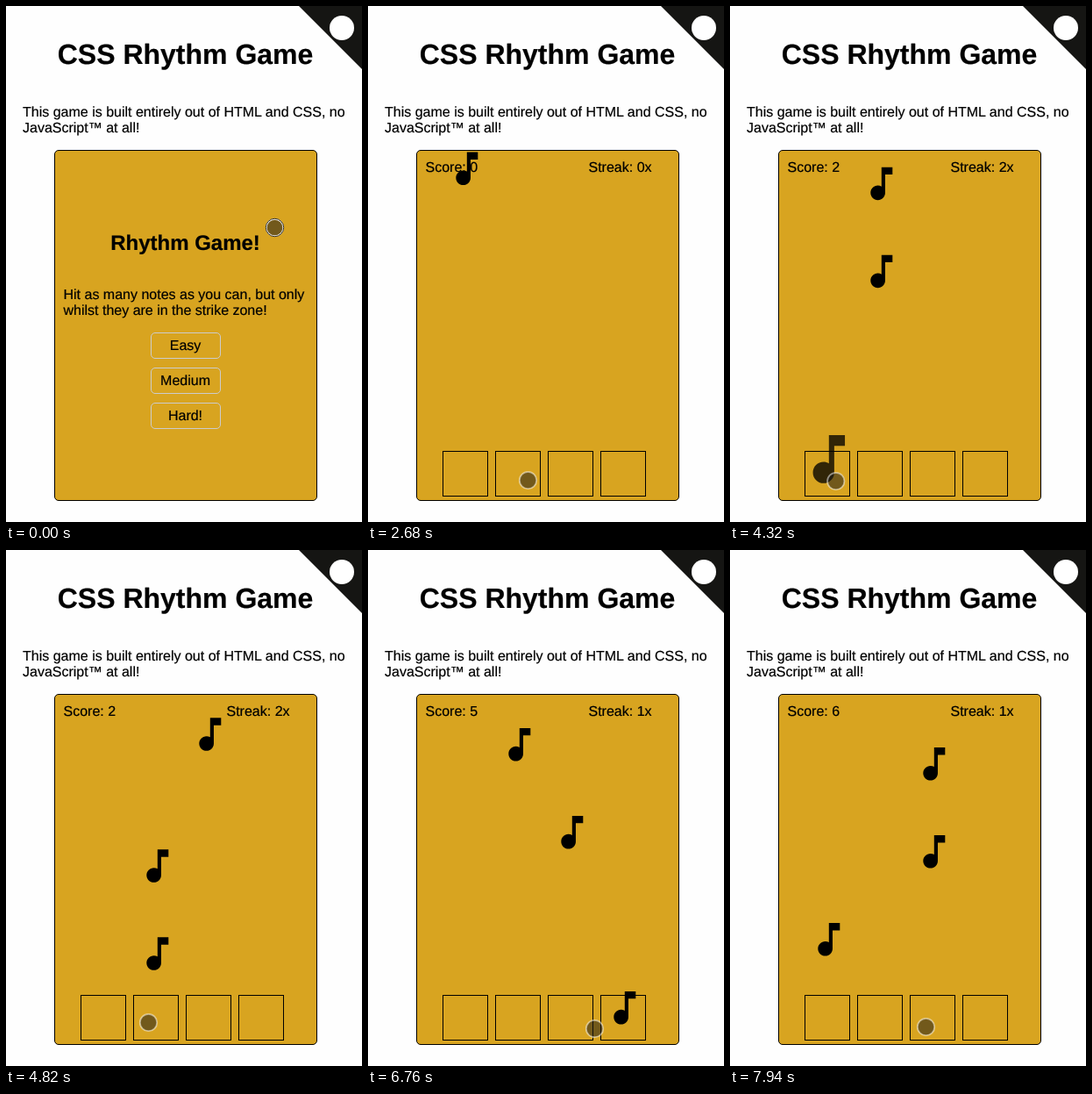
Recreate the animation shown at these times as an HTML page. Size 406 by 588 pixels, loop 8000 ms.

```html
<!DOCTYPE html>
<html lang="en">
<head>
<meta charset="utf-8">
<title>CSS Rhythm Game</title>
<style>
  html, body { margin: 0; width: 100%; height: 100%; overflow: hidden; background: #fefefe; }
  svg { display: block; width: 406px; height: 588px; font: 16px "Liberation Sans", Arial, sans-serif; }
  text { text-rendering: geometricPrecision; stroke: #000; stroke-width: .2px; }
  .title { font-size: 32px; font-weight: bold; }
  .heading { font-size: 24px; font-weight: bold; }
  .middle { text-anchor: middle; }
  .line { fill: none; stroke: #000; }
  .button { fill: none; stroke: #ccc; }
</style>
</head>
<body>
<svg viewBox="0 0 406 588">
  <defs>
    <path id="note" transform="scale(2.0833) translate(-12 -12)"
      d="M12 3v10.55c-.59-.34-1.27-.55-2-.55-2.21 0-4 1.79-4 4s1.79 4 4 4 4-1.79 4-4V7h4V3z"/>
    <clipPath id="inside"><rect x="56" y="165" width="298" height="398" rx="4"/></clipPath>
  </defs>

  <path d="M334 0H406V72Z" fill="#151513"/>
  <circle cx="383" cy="25" r="14" fill="#fff"/>

  <text class="title middle" x="204.5" y="66">CSS Rhythm Game</text>
  <text x="19" y="126">This game is built entirely out of HTML and CSS, no</text>
  <text x="19" y="144">JavaScript™ at all!</text>
  <rect x="55.5" y="164.5" width="299" height="399" rx="4.5" fill="#d8a420" stroke="#000"/>

  <g id="menu">
    <text class="heading middle" x="204.5" y="278">Rhythm Game!</text>
    <text x="65.5" y="334">Hit as many notes as you can, but only</text>
    <text x="65.5" y="352">whilst they are in the strike zone!</text>
  </g>
  <g id="game">
    <g id="zones"></g>
    <text id="score" x="65.5" y="189"></text>
    <text id="streak" x="251.5" y="189"></text>
    <g id="notes" clip-path="url(#inside)"></g>
  </g>

  <g id="cursor">
    <circle r="9.7" fill="#1c1a18" fill-opacity=".54"/>
    <circle id="ring" r="9.7" fill="none" stroke="#fff" stroke-width="1.8"/>
    <circle id="outline" r="10.2" fill="none" stroke="#000" stroke-width=".8"/>
  </g>
</svg>
<script>
const LOOP = 8000, SPEED = 0.3153, BEAT = 50, HIT_Y = 528, POP = 335, GLIDE = 450;
const $ = id => document.getElementById(id);
const clamp = v => Math.min(1, Math.max(0, v));
const smooth = p => p * p * (3 - 2 * p);

function add(parent, tag, attrs, text = '') {
  const el = document.createElementNS('http://www.w3.org/2000/svg', tag);
  for (const key in attrs) el.setAttribute(key, attrs[key]);
  el.textContent = text;
  return parent.appendChild(el);
}

['Easy', 'Medium', 'Hard!'].forEach((label, i) => {
  const y = 372.5 + 40 * i;
  add($('menu'), 'rect', { class: 'button', x: 165.5, y, width: 79, height: 29, rx: 4.5 });
  add($('menu'), 'text', { class: 'middle', x: 204.5, y: y + 19.5 }, label);
});
for (let lane = 0; lane < 4; lane++) {
  add($('zones'), 'rect', { class: 'line', x: 85.5 + 60 * lane, y: 507.5, width: 51, height: 51 });
}

// One character per beat: the lane of the note, in brackets if the player misses it.
const melody = '1--1----2-2--(3)--1--(4)---3-(2)--1-3-3';
const firstY = t => 185 + (t - 2680) * SPEED;
const timeAt = y => 2680 + (y - 185) / SPEED;

const notes = melody.match(/\(?[\d-]\)?/g).flatMap((mark, beat) => {
  const lane = parseInt(mark.replace('(', ''));
  if (!lane) return [];
  const gap = beat * BEAT;
  return {
    gap,
    x: 52.8 + 60 * lane,
    hit: mark[0] === '(' ? Infinity : timeAt(HIT_Y + gap),
    el: add($('notes'), 'use', { href: '#note' })
  };
});

// Each glide of the pointer: [start, x, y]
const glides = [
  [300, 198.5, 432], [2230, 182.5, 540.5], [3250, 120.5, 541.5], [4300, 162.5, 538.5],
  [5600, 90, 542], [6310, 258.5, 545.5], [6800, 223.5, 543.5]
];

function pointerAt(t) {
  return glides.reduce(([x, y], [start, toX, toY]) => {
    const p = smooth(clamp((t - start) / GLIDE));
    return [x + (toX - x) * p, y + (toY - y) * p];
  }, [306.5, 252.5]);
}

// A miss breaks the streak once the next note is hit.
function tally(t) {
  let score = 0, streak = 0, last = -1;
  notes.forEach((note, i) => {
    if (note.hit > t) return;
    score++;
    streak = i === last + 1 ? streak + 1 : 1;
    last = i;
  });
  $('score').textContent = 'Score: ' + score;
  $('streak').textContent = 'Streak: ' + streak + 'x';
}

// A hit note stops, then grows from its bottom edge while it fades.
function placeNote({ gap, x, hit, el }, t) {
  const p = clamp((t - hit) / POP);
  const y = firstY(Math.min(t, hit)) - gap;
  const scale = 2 - (1 - p) ** 2.35;
  el.setAttribute('transform', `translate(${x} ${y - 25 * (scale - 1)}) scale(${scale})`);
  el.setAttribute('opacity', 1 - p);
}

function draw(now) {
  const t = now % LOOP;
  const shown = clamp((t - 1450) / 290);
  $('menu').setAttribute('opacity', 1 - shown);
  $('game').setAttribute('opacity', shown);
  tally(t);
  notes.forEach(note => placeNote(note, t));

  const pressed = t < 30;
  $('cursor').setAttribute('transform', `translate(${pointerAt(t)})`);
  $('outline').setAttribute('opacity', pressed ? 1 : 0);
  $('ring').setAttribute('opacity', pressed ? 0.85 : 0.5);
  requestAnimationFrame(draw);
}
draw(performance.now());
</script>
</body>
</html>
```
